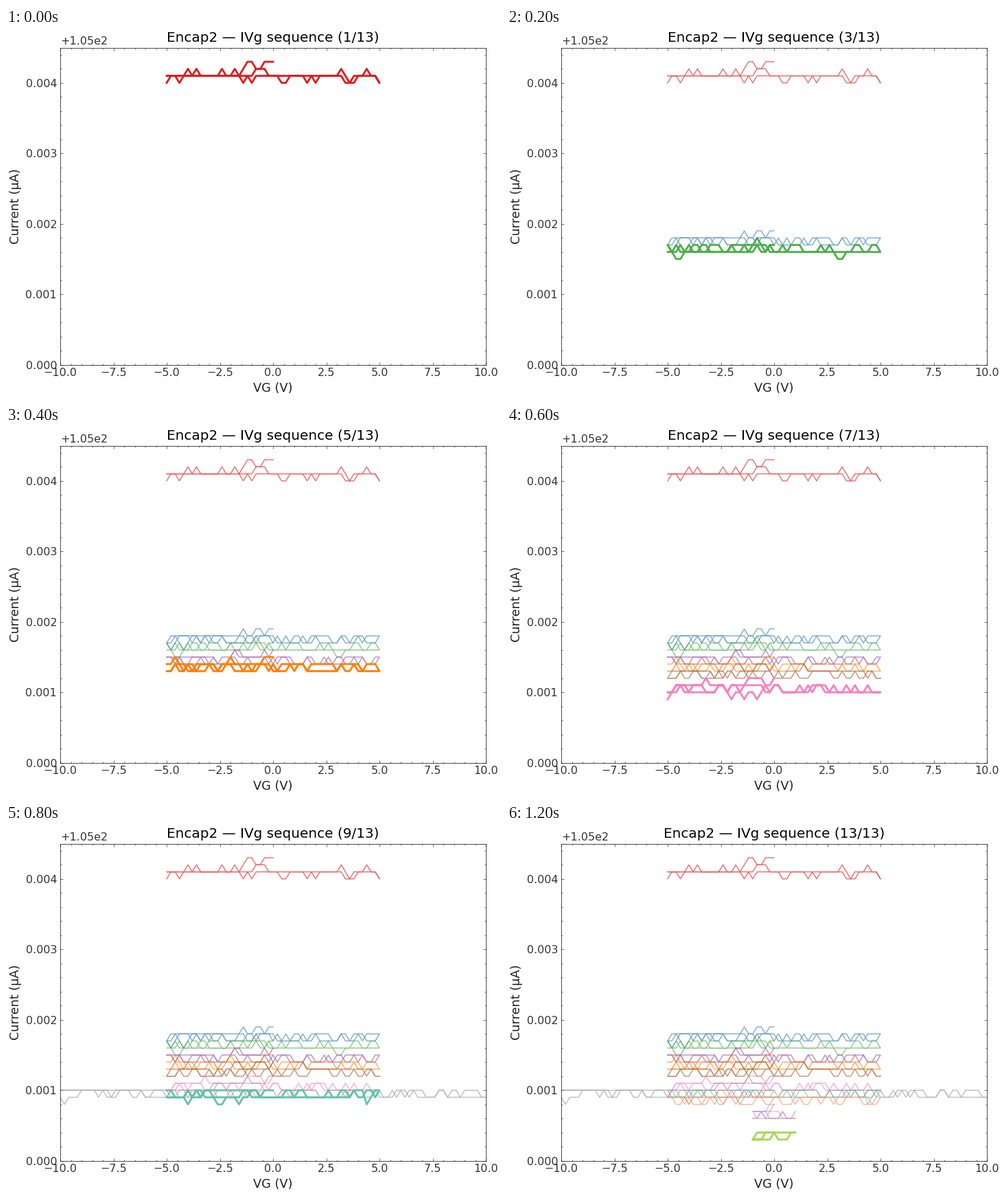
Write a matplotlib script that moves like this. It is 721 by 538 pixels and loops after 1.3 s.

```python
import matplotlib.pyplot as plt
import numpy as np
from matplotlib.animation import FuncAnimation
from matplotlib.ticker import AutoMinorLocator, MultipleLocator

DPI, W, H = 100, 721, 538
STEP = 0.2        # gate step in volts
UNIT = 1e-4       # current resolution in microamps
OFFSET = 105

plt.rcParams.update({
    "font.family": "DejaVu Sans", "font.size": 11.5,
    "axes.linewidth": 0.5, "axes.labelsize": 12.8, "axes.titlesize": 14.4,
    "axes.labelcolor": "0.13",
    "xtick.direction": "in", "ytick.direction": "in",
    "xtick.top": True, "ytick.right": True,
    "xtick.color": "0.2", "ytick.color": "0.2",
})
for axis in ("xtick", "ytick"):
    for kind, size in (("major", 3), ("minor", 1.5)):
        plt.rcParams[f"{axis}.{kind}.size"] = size
        plt.rcParams[f"{axis}.{kind}.width"] = 0.5

# Settled level and extra level at the start of each sweep, in units
LEVELS = [(40.9, 1.9), (17.5, 1.6), (16.2, 1.2), (14.5, 1.5), (13.5, 1.2),
          (12.7, 1.0), (10.4, 1.4), (9.6, 2.2), (9.2, 1.3), (8.7, 1.0),
          (6.5, 1.5), (6.4, 2.0), (3.6, 0.4)]
SET1, SET2 = plt.cm.Set1.colors, plt.cm.Set2.colors
COLORS = [*SET1[:5], *SET1[6:], *SET2[:5]]   # yellow is left out


def half_span(k):
    """Steps from zero to the turning point of sweep k."""
    return 50 if k == 7 else 25 if k < 10 else 5


def sweep(k, settled, extra):
    """Gate 0 -> -n -> n -> -n; a decaying, noisy level read in whole units."""
    rng = np.random.default_rng(k)
    n = half_span(k)
    gate = np.r_[0:-n:-1, -n:n, n:-n - 1:-1]
    t = np.arange(gate.size)
    noise = np.convolve(rng.normal(0, 0.4, gate.size + 1), (0.85, 0.5), "valid")
    noise[0] = 0
    level = np.round(settled + extra * np.exp(-t / (0.4 * n)) + noise)
    return gate * STEP, OFFSET + level * UNIT


fig = plt.figure(figsize=(W / DPI, H / DPI), dpi=DPI, facecolor="white")
ax = fig.add_axes([79 / W, 48.4 / H, 620 / W, 461 / H])
ax.set(xlim=(-10, 10), ylim=(OFFSET, OFFSET + 0.0045),
       xlabel="VG (V)", ylabel="Current (µA)")
for axis, major in ((ax.xaxis, 2.5), (ax.yaxis, 0.001)):
    axis.set_major_locator(MultipleLocator(major))
    axis.set_minor_locator(AutoMinorLocator(5))
title = ax.set_title("")
lines = [ax.plot(*sweep(k, *level), color=color)[0]
         for k, (level, color) in enumerate(zip(LEVELS, COLORS))]


def update(i):
    for k, line in enumerate(lines):
        line.set_visible(k <= i)
        line.set_linewidth(2 if k == i else 1)
        line.set_alpha(1 if k == i else 0.65)
    title.set_text(f"Encap2 — IVg sequence ({i + 1}/{len(lines)})")
    return [*lines, title]


anim = FuncAnimation(fig, update, frames=len(lines), interval=100,
                     repeat=True, repeat_delay=0, blit=False)
plt.show()
```
